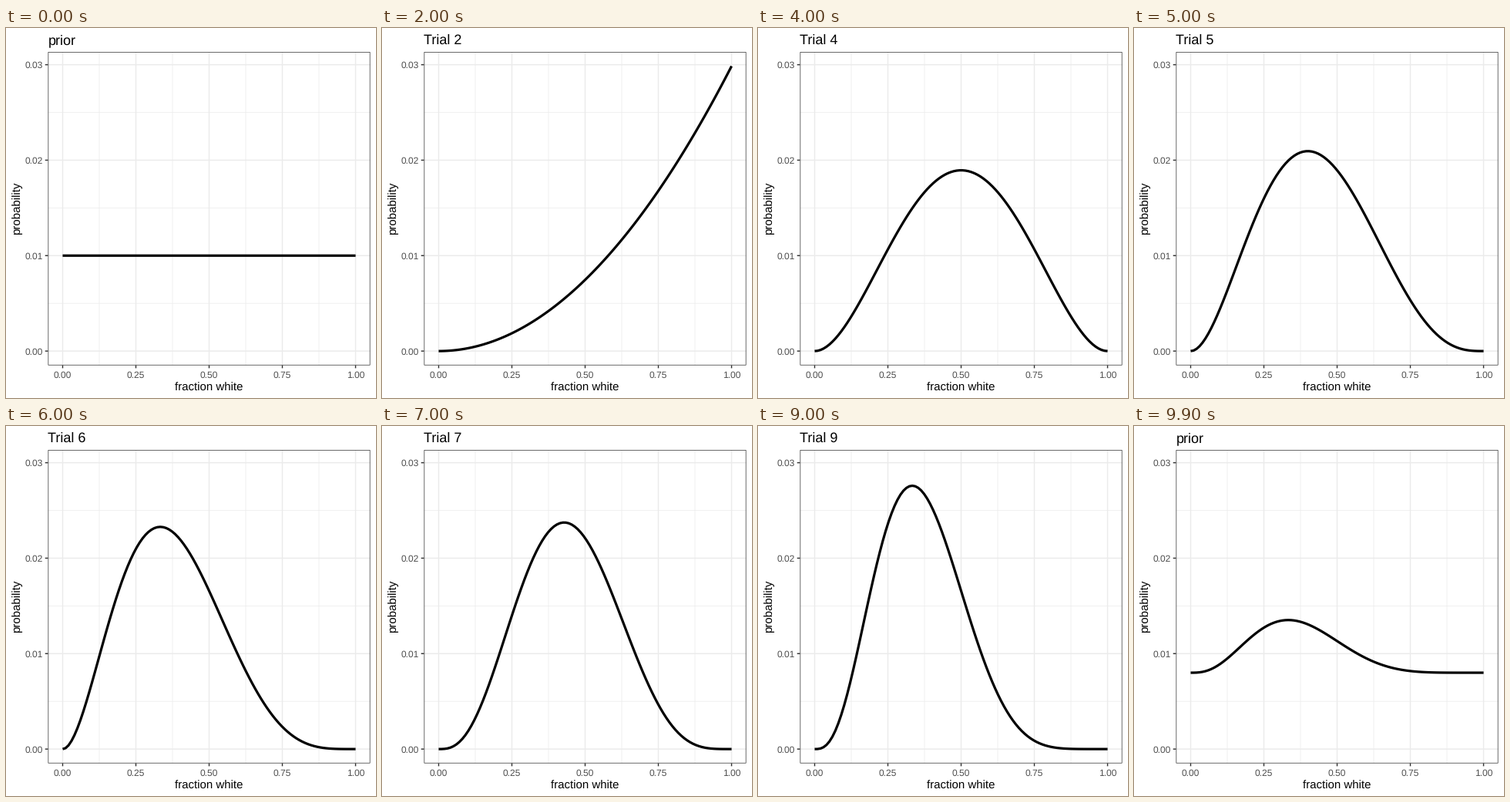
Write a matplotlib script that moves like this. It is 480 px wide and 480 px high and loops after 10000 ms.

```python
import numpy as np
import matplotlib.pyplot as plt
from matplotlib.animation import FuncAnimation

plt.rcParams.update({
    "font.family": "Liberation Sans",
    "text.hinting": "none",
    "path.snap": False,
    "lines.solid_capstyle": "butt",
    "lines.solid_joinstyle": "round",
})

SIZE = 480
LEFT, RIGHT, TOP, BOTTOM = 54.5, 472.5, 31.0, 437.6
GRID, EDGE, LABEL = "#ebebeb", "#333333", "#4d4d4d"
THICK = 1.45
TICK = 3.75

# Posterior over the fraction after each draw (W = white, B = black)
DRAWS = "WWBBBBWBB"
p = np.linspace(0, 1, 100)


def posterior(draws):
    weight = p ** draws.count("W") * (1 - p) ** draws.count("B")
    return weight / weight.sum()


states = [posterior(DRAWS[:n]) for n in range(len(DRAWS) + 1)]
titles = ["prior"] + [f"Trial {n}" for n in range(1, len(DRAWS) + 1)]
peak = max(s.max() for s in states)


# Data to pixels, with 5 % padding on each side
def x_px(v):
    return LEFT + (RIGHT - LEFT) * (v + 0.05) / 1.1


def y_px(v):
    return BOTTOM - (BOTTOM - TOP) * (v / peak + 0.05) / 1.1


fig = plt.figure(figsize=(SIZE / 72, SIZE / 72), dpi=72, facecolor="white")
ax = fig.add_axes([0, 0, 1, 1])
ax.set_xlim(0, SIZE)
ax.set_ylim(SIZE, 0)
ax.axis("off")


def segment(x, y, color, width, z):
    ax.plot(x, y, color=color, lw=width, zorder=z)


def grid_x(v, width):
    segment([x_px(v)] * 2, [TOP, BOTTOM], GRID, width, 1)


def grid_y(v, width):
    segment([LEFT, RIGHT], [y_px(v)] * 2, GRID, width, 1)


for v in np.arange(0.125, 1, 0.25):
    grid_x(v, THICK / 2)
for v in (0.005, 0.015, 0.025):
    grid_y(v, THICK / 2)

for v in np.linspace(0, 1, 5):
    x = x_px(v)
    grid_x(v, THICK)
    segment([x, x], [BOTTOM, BOTTOM + TICK], EDGE, THICK, 4)
    ax.text(x, 453.6, f"{v:.2f}", size=12, color=LABEL, ha="center", va="baseline")

for v in np.linspace(0, 0.03, 4):
    y = y_px(v)
    grid_y(v, THICK)
    segment([LEFT - TICK, LEFT], [y, y], EDGE, THICK, 4)
    ax.text(LEFT - 6.75, y + 4.3, f"{v:.2f}", size=12, color=LABEL,
            ha="right", va="baseline")

# Only the inner half of the panel border is visible
half = THICK / 2
inset = half / 2
ax.add_patch(plt.Rectangle((LEFT + inset, TOP + inset),
                           RIGHT - LEFT - half, BOTTOM - TOP - half,
                           fill=False, ec=EDGE, lw=half, zorder=3))

ax.text((LEFT + RIGHT) / 2, 470.6, "fraction white", size=15,
        ha="center", va="baseline")
ax.text(18.4, (TOP + BOTTOM) / 2, "probability", size=15, rotation=90,
        rotation_mode="anchor", ha="center", va="baseline")

title = ax.text(LEFT, 21, "", size=18, ha="left", va="baseline")
curve, = ax.plot([], [], color="black", lw=3.2, zorder=2)


def draw(frame):
    # Ten frames per state: rest, then a linear blend to the next one
    now, step = divmod(frame, 10)
    after = (now + 1) % len(states)
    mix = max(0, step - 5) / 5
    curve.set_data(x_px(p), y_px((1 - mix) * states[now] + mix * states[after]))
    title.set_text(titles[after if mix > 0.5 else now])
    return curve, title


anim = FuncAnimation(fig, draw, frames=10 * len(states), interval=100,
                     repeat=True, repeat_delay=0)
plt.show()
```
